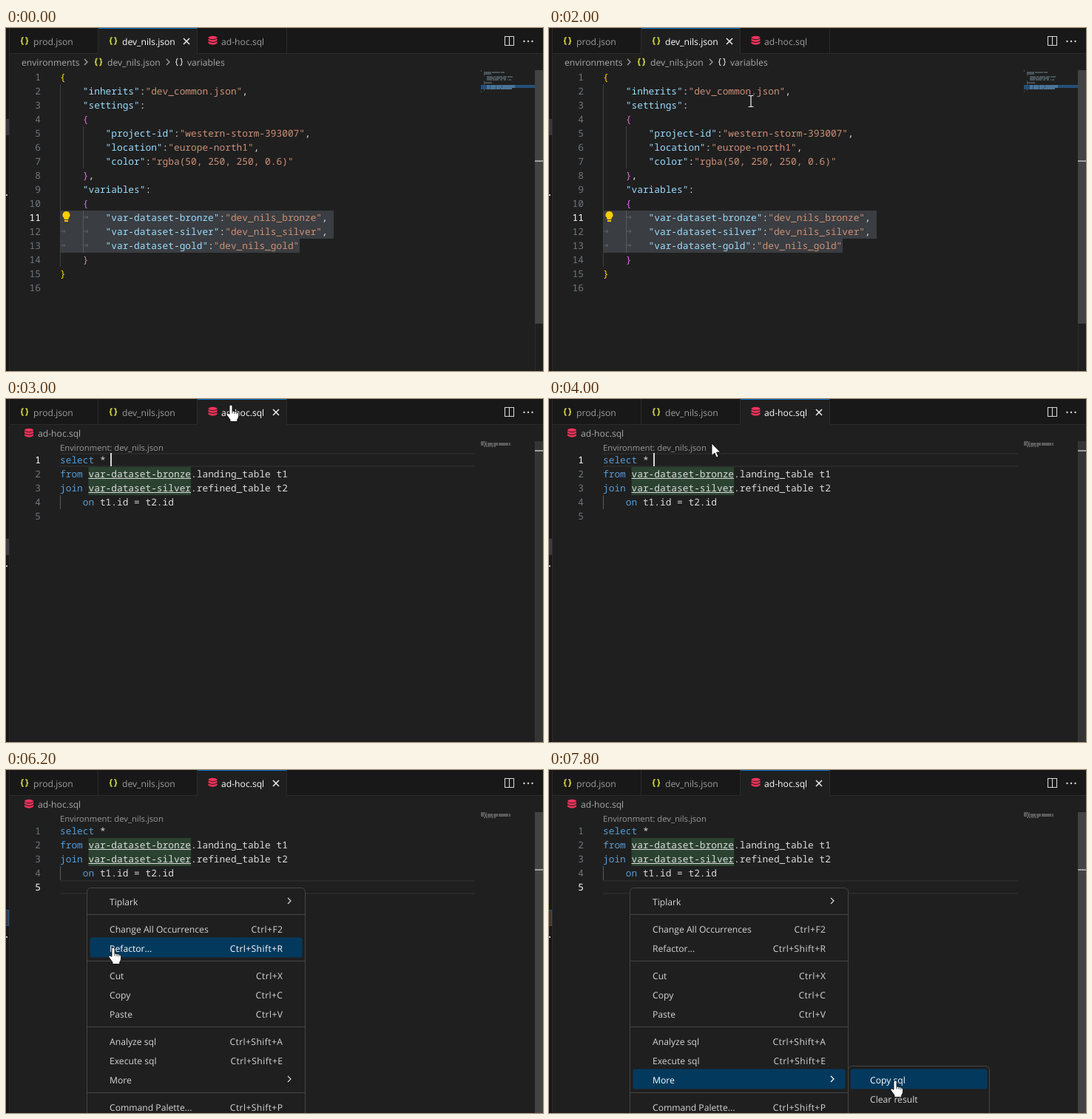
These frames come from a looping animation (726x464 px, 8 s). An HTML page:

```html
<!DOCTYPE html>
<html lang="en">
<head>
<meta charset="utf-8">
<title>Editor demo</title>
<style>
html, body { margin: 0; width: 100%; height: 100%; overflow: hidden; background: #1f1f1f; }
svg { display: block; width: 726px; height: 464px; }
text { white-space: pre; text-rendering: geometricPrecision; font-variant-ligatures: none; }
.ui { font: 450 12.15px "Open Sans", "Noto Sans", sans-serif; }
.keys { letter-spacing: .4px; }
.lens { font: 11.25px "Open Sans", "Noto Sans", sans-serif; }
.code { font: 450 12.833px "Noto Sans Mono", "DejaVu Sans Mono", monospace; }
</style>
</head>
<body>
<svg id="stage" viewBox="0 0 726 464"></svg>
<script>
const LOOP = 8000, STEP = 200, LINE = 19, LEFT = 73, SQL_TOP = 73;
const C = {
  bg: '#1f1f1f', bar: '#181818', edge: '#2b2b2b', dim: '#9d9d9d', text: '#d6d6d6', num: '#6e7681',
  key: '#9cdcfe', str: '#ce9178', word: '#569cd6', gold: '#ffd700', pink: '#da70d6',
  json: '#cbcb41', db: '#f0325a', pick: '#04395e', guide: '#404040'
};

const jsonLines = [
  '{',
  '    "inherits":"dev_common.json",',
  '    "settings":',
  '    {',
  '        "project-id":"western-storm-393007",',
  '        "location":"europe-north1",',
  '        "color":"rgba(50, 250, 250, 0.6)"',
  '    },',
  '    "variables":',
  '    {',
  '        "var-dataset-bronze":"dev_nils_bronze",',
  '        "var-dataset-silver":"dev_nils_silver",',
  '        "var-dataset-gold":"dev_nils_gold"',
  '    }',
  '}',
  ''
];
const sqlLines = [
  'select * ',
  'from var-dataset-bronze.landing_table t1',
  'join var-dataset-silver.refined_table t2',
  '    on t1.id = t2.id',
  ''
];
const menuRows = [
  [178, 'Tiplark', '>'],
  [215, 'Change All Occurrences', 'Ctrl+F2'], [241, 'Refactor...', 'Ctrl+Shift+R'],
  [278, 'Cut', 'Ctrl+X'], [304, 'Copy', 'Ctrl+C'], [330, 'Paste', 'Ctrl+V'],
  [367, 'Analyze sql', 'Ctrl+Shift+A'], [393, 'Execute sql', 'Ctrl+Shift+E'], [419, 'More', '>'],
  [456, 'Command Palette...', 'Ctrl+Shift+P']
];
// time, pointer shape, hot spot
const pointerKeys = [
  [1800, 'beam', 218, 148], [2000, 'beam', 273, 99], [2200, 'beam', 288, 70], [2400, 'arrow', 299, 40],
  [2600, 'hand', 304, 12], [2800, 'hand', 304, 8], [3200, 'hand', 304, 8], [3600, 'arrow', 262, 40],
  [4000, 'arrow', 220, 60], [4400, 'arrow', 220, 60], [4800, 'beam', 150, 110], [5200, 'beam', 112, 159],
  [5600, 'arrow', 112, 159], [6000, 'arrow', 112, 159], [6200, 'hand', 145, 240], [6400, 'hand', 196, 360],
  [6600, 'hand', 218, 409], [6800, 'hand', 270, 414], [7000, 'hand', 365, 417], [7200, 'hand', 441, 415],
  [7400, 'hand', 452, 414], [7600, 'hand', 463, 418], [7800, 'hand', 468, 420], [8000, 'hand', 468, 420]
];

const rect = (x, y, w, h, fill, more = '') =>
  `<rect x="${x}" y="${y}" width="${w}" height="${h}" fill="${fill}" ${more}/>`;
const path = (d, stroke, w = 1, more = 'fill="none"') =>
  `<path d="${d}" stroke="${stroke}" stroke-width="${w}" ${more}/>`;
const text = (x, y, s, fill, cls = 'ui', more = '') =>
  `<text x="${x}" y="${y}" class="${cls}" fill="${fill}" ${more}>${s}</text>`;
const group = (id, body) => `<g id="${id}">${body}</g>`;
const span = (s, fill) => `<tspan fill="${fill}">${s}</tspan>`;

const braces = (x, y, color, w = 1.8) => `<g transform="translate(${x} ${y})">` + path(
  'M4.6-4.6Q2.6-4.6 2.6-2.8V-1.4Q2.6 0 1 0Q2.6 0 2.6 1.4V2.8Q2.6 4.6 4.6 4.6' +
  'M7.4-4.6Q9.4-4.6 9.4-2.8V-1.4Q9.4 0 11 0Q9.4 0 9.4 1.4V2.8Q9.4 4.6 7.4 4.6', color, w) + '</g>';
const disks = (x, y) => `<g transform="translate(${x} ${y})" fill="${C.db}">` +
  '<ellipse cy="-4" rx="6" ry="2.2"/>' +
  [-2.6, 1.2].map(v => `<path d="M-6 ${v}Q0 ${v + 3.6} 6 ${v}V${v + 2.6}Q0 ${v + 6.4}-6 ${v + 2.6}Z"/>`).join('') + '</g>';
const chevron = (x, y, color, r = 4) => path(`M${x - r / 2} ${y - r}l${r} ${r}l${-r} ${r}`, color, 1.2);
const cross = (x, y) => path(`M${x - 4} ${y - 4}l8 8M${x + 4} ${y - 4}l-8 8`, '#f0f0f0', 1.5);

function colorJson(line) {
  const brace = line.startsWith(' ') ? C.pink : C.gold;
  return line.replace(/"[^"]*"(?=:)|"[^"]*"|[{}]/g, (m, at) =>
    span(m, m[0] !== '"' ? brace : line[at + m.length] === ':' ? C.key : C.str));
}
const colorSql = line => line.replace(/\b(select|from|join|on)\b/g, m => span(m, C.word));

const codeRows = (lines, top, paint) => lines.map((s, i) =>
  text(LEFT, top + 14 + i * LINE, paint(s), '#dcdcdc', 'code')).join('');
const numbers = (count, top, active) => Array.from({ length: count }, (_, i) =>
  text(47, top + 14 + i * LINE, i + 1, i + 1 === active ? '#ffffff' : C.num, 'code', 'text-anchor="end"')).join('');

function minimap(lines, color) {
  let out = '';
  lines.forEach((s, i) => {
    for (const m of s.matchAll(/[^\s.:,-]+/g))
      out += rect(642 + m.index, 57.5 + i * 2, m[0].length, 1.2, color, 'opacity=".55"');
  });
  return out;
}

// Tab strip; active: 0 = json, 1 = sql
function tabs(active) {
  const [x, w] = [[125, 133], [259, 120]][active];
  const shade = i => i === active ? '#ffffff' : C.dim;
  return rect(x, 0, w, 35, C.bg) + rect(x, 0, w, 1, '#0078d4') +
    braces(19, 17.5, C.json) + text(37, 22.5, 'prod.json', C.dim) +
    braces(139, 17.5, C.json) + text(157, 22.5, 'dev_nils.json', shade(0)) +
    disks(279.5, 17) + text(291, 22.5, 'ad-hoc.sql', shade(1)) +
    cross(active ? 365 : 244, 18);
}

const base = rect(0, 0, 726, 464, C.bg) + rect(0, 0, 726, 34, C.bar) + rect(0, 34, 726, 1, C.edge) +
  rect(0, 0, 4, 464, C.bar) + rect(4, 0, 1, 464, C.edge) +
  [124, 258, 379].map(x => rect(x, 0, 1, 35, C.edge)).join('') +
  path('M674.5 11.5h12v12h-12zM680.5 11.5v12', C.text, 1.1) +
  [700.5, 706, 711.5].map(x => `<circle cx="${x}" cy="18" r="1.2" fill="${C.text}"/>`).join('') +
  rect(0, 225, 2, 2, '#bbbbbb') + rect(715, 57, 1, 407, C.edge);

const selected = [[247, 370], [266, 370], [285, 324]].map(([y, w]) => rect(LEFT, y, w, LINE, '#3a3d41')).join('');
const arrows = [[107, 261], [76, 280], [107, 280], [76, 299], [107, 299]].map(([x, y]) =>
  path(`M${x - 2} ${y - 5}h6m-2-2l2 2l-2 2`, '#62666a', .9)).join('');
const bulb = '<path d="M81.5 248a5 5 0 0 1 3 9v2h-6v-2a5 5 0 0 1 3-9z" fill="#ffcc00"/>' + rect(79, 260, 5, 2, '#ffcc00');

const jsonView = tabs(0) + rect(0, 123, 4, 22, '#37373d') +
  text(21, 51, 'environments', '#a9a9a9') + chevron(108, 46, '#a9a9a9') +
  braces(119, 46, C.json) + text(137, 51, 'dev_nils.json', '#a9a9a9') + chevron(219, 46, '#a9a9a9') +
  braces(228, 46, C.text, 1.2) + text(245, 51, 'variables', '#a9a9a9') +
  selected + rect(LEFT, 76, 1, 247, C.guide) + rect(104, 133, 1, 57, C.guide) + rect(104, 247, 1, 57, '#5a5a5a') +
  arrows + bulb + numbers(16, 57, 11) + codeRows(jsonLines, 57, colorJson) +
  rect(642, 77, 73, 4, '#264f78') + rect(642, 81, 42, 2, '#264f78') + minimap(jsonLines, '#9cbfd0') +
  rect(715, 57, 11, 343, '#434343', 'id="jsonBar"') + rect(715, 179, 11, 2, '#a0a0a0');

const lineFrame = y => path(`M${LEFT} ${y + 1}H634M${LEFT} ${y + LINE - 1}H634`, '#292929', 2);
const sqlView = tabs(1) + disks(31, 46) + text(43, 51, 'ad-hoc.sql', '#a9a9a9') +
  rect(0, 189, 4, 22, '#3f3a42') +
  text(LEFT, 70, 'Environment: dev_nils.json', '#999999', 'lens') +
  rect(111.5, 92, 138.6, 38, '#2b4230') + rect(LEFT, 130, 1, 19, '#5a5a5a') +
  group('lineOne', lineFrame(SQL_TOP) + numbers(5, SQL_TOP, 1) + rect(141, 73, 2, 18, '#d8d8d8')) +
  group('lineFive', lineFrame(SQL_TOP + 4 * LINE) + numbers(5, SQL_TOP, 5) +
    rect(-1, 189.5, 4.5, 21, '#37373d', 'stroke="#24577f"')) +
  codeRows(sqlLines, SQL_TOP, colorSql) +
  rect(111.5, 107, 138.6, 1, '#dcdcdc') + rect(111.5, 126, 138.6, 1, '#dcdcdc') +
  minimap(sqlLines, '#d4d4d4') + rect(715, 57, 11, 407, '#434343', 'id="sqlBar"') +
  rect(715, 0, 11, 2, '#a0a0a0', 'id="ruler"');

const panel = (x, y, w) => rect(x + .5, y + .5, w, 90 + 464 - y, C.bg, 'rx="5" stroke="#454545"');
const menuItem = ([y, name, keys]) => `<g data-y="${y}" color="${C.text}">` +
  text(140, y + 4.5, name, 'currentColor') +
  (keys === '>' ? chevron(383, y - 1, 'currentColor')
    : text(374.4, y + 4.5, keys, 'currentColor', 'ui keys', 'text-anchor="end"')) + '</g>';
const menuView = panel(109, 159, 295) + rect(113.5, 0, 287, 27, C.pick, 'rx="3" id="pick"') +
  [195, 258, 347, 436].map(y => rect(110, y, 294, 1, '#454545')).join('') + menuRows.map(menuItem).join('');
const subView = panel(404, 400, 191) + rect(407.5, 404.5, 185, 27, C.pick, 'rx="3" id="subPick"') +
  text(434, 423.5, 'Copy sql', '#ffffff') + text(434, 449.5, 'Clear result', C.text);

const pointers =
  group('beam', path('M-3.5-7.5H-1Q0-7.5 0-6.5Q0-7.5 1-7.5H3.5M0-6.5V6.5M-3.5 7.5H-1Q0 7.5 0 6.5Q0 7.5 1 7.5H3.5', '#f0f0f0', 1.2)) +
  group('arrow', path('M0 0V16.5L3.8 13L6.4 19L9 17.9L6.5 12H11.6Z', '#000', .8, 'fill="#fff"')) +
  group('hand', path('M-2 2Q-2 0 0 0T2 2V8L8 9.3Q10.5 10 10.5 12.5V15Q10.5 17 9.5 18.5L8.7 20V22.5H-1V20L-5.6 13.6Q-6.6 12-5.3 11.2T-2.6 12L-2 12.6Z',
    '#000', .8, 'fill="#fff"') + path('M2 8V11.5M5 8.8V12M7.8 9.6V12.4', '#000', .8));

document.getElementById('stage').innerHTML = base + group('json', jsonView) + group('sql', sqlView) +
  group('menu', menuView) + group('sub', subView) + group('pointer', pointers);

const el = id => document.getElementById(id);
const show = (id, on) => el(id).setAttribute('display', on ? 'inline' : 'none');
const items = [...document.querySelectorAll('[data-y]')];

function pointerAt(t) {
  const i = pointerKeys.findLastIndex(k => k[0] <= t);
  if (i < 0) return null;
  const a = pointerKeys[i], b = pointerKeys[i + 1] || a;
  const p = b === a ? 0 : (t - a[0]) / (b[0] - a[0]);
  return { kind: a[1], x: a[2] + (b[2] - a[2]) * p, y: a[3] + (b[3] - a[3]) * p };
}

function draw(t) {
  const sql = t >= 3000, menu = t >= 5600, sub = t >= 7000;
  show('json', !sql);
  show('sql', sql);
  show('jsonBar', t < 2600);
  show('lineOne', !menu);
  show('lineFive', menu);
  show('menu', menu);
  show('sub', sub);
  el('sqlBar').setAttribute('opacity', t > 4000 ? 1 : .6);
  el('ruler').setAttribute('y', menu ? 134 : 69);

  const p = pointerAt(t);
  show('pointer', p);
  if (!p) return;
  el('pointer').setAttribute('transform', `translate(${p.x} ${p.y})`);
  ['beam', 'arrow', 'hand'].forEach(k => show(k, k === p.kind));
  const row = sub ? 419 : menuRows.map(r => r[0]).find(y => Math.abs(y - p.y) < 13);
  const picked = p.kind === 'hand' && row;
  show('pick', picked);
  if (picked) el('pick').setAttribute('y', row - 14.5);
  items.forEach(g => g.setAttribute('color', +g.dataset.y === picked ? '#ffffff' : C.text));
  show('subPick', sub && p.x > 404);
}

const start = performance.now();
function tick() {
  const t = (performance.now() - start) % LOOP;
  draw(Math.floor(t / STEP) * STEP);
  requestAnimationFrame(tick);
}
tick();
</script>
</body>
</html>
```
